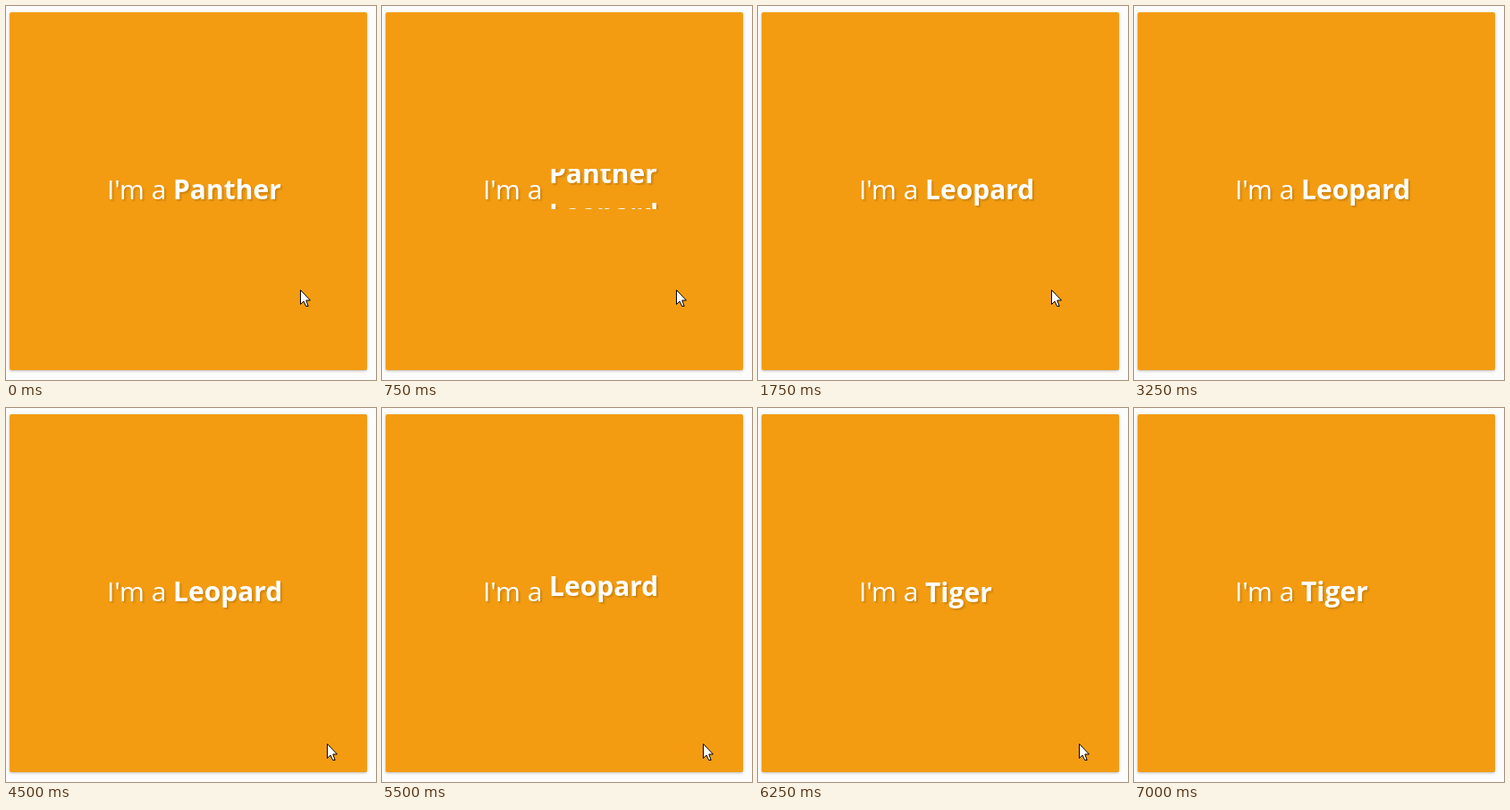
Recreate the animation shown at these times as an HTML page. Size 414x418 px, loop 8000 ms.

```html
<!DOCTYPE html>
<html lang="en">
<head>
<meta charset="utf-8">
<title>Rolling words</title>
<style>
html, body { margin: 0; width: 100%; height: 100%; overflow: hidden; background: #fcfcfc; }
div, svg { position: absolute; }
#card {
  left: 4px; top: 7px; width: 400px; height: 400px;
  border-radius: 2px; background: #f39c12;
  box-shadow: 0 1px 3px rgba(0, 0, 0, .25);
}
.line {
  top: 182px; height: 45px; overflow: hidden;
  font: 400 30px/45px "Open Sans", sans-serif; white-space: pre;
  color: #fff; text-shadow: 2px 2px 2px rgba(0, 0, 0, .15);
}
#lead { left: 113px; width: 72px; }
#window { left: 187px; width: 135px; font-weight: 700; }
#cursor { left: 0; top: 0; }
</style>
</head>
<body>
<div id="card"></div>
<div class="line" id="lead">I'm a</div>
<div class="line" id="window"><div id="words">Panther
Leopard
Tiger</div></div>
<svg id="cursor" width="13" height="20">
  <path d="M.5 .5V16.5L4 13 6.6 18.5H9.2L6.8 12H11.5Z" fill="#fff" stroke="#000"/>
</svg>
<script>
const LOOP = 8000, STEP = 250, LINE = 45, ROLL = 1100;
const rollStarts = [270, 5240];
// [from, until, x, y]; the pointer is off stage between spans
const pointer = [
  [0, 1750, 329, 317],
  [1750, 3250, 328, 317],
  [4500, 6750, 359, 375],
  [6750, 7000, 346, 376]
];
const words = document.getElementById("words");
const cursor = document.getElementById("cursor");

function swing(t, start) {
  const u = Math.min(1, Math.max(0, (t - start) / ROLL));
  return (1 - Math.cos(Math.PI * u)) / 2;
}

function draw(now) {
  // the picture advances in quarter-second steps
  const t = Math.floor(now % LOOP / STEP) * STEP;
  const lines = rollStarts.reduce((sum, start) => sum + swing(t, start), 0);
  words.style.top = -Math.round(lines * LINE) + "px";

  const spot = pointer.find(([from, until]) => t >= from && t < until);
  cursor.style.display = spot ? "block" : "none";
  if (spot) cursor.style.transform = `translate(${spot[2]}px, ${spot[3]}px)`;
}

const begin = performance.now();
function tick() {
  draw(performance.now() - begin);
  requestAnimationFrame(tick);
}
tick();
</script>
</body>
</html>
```
